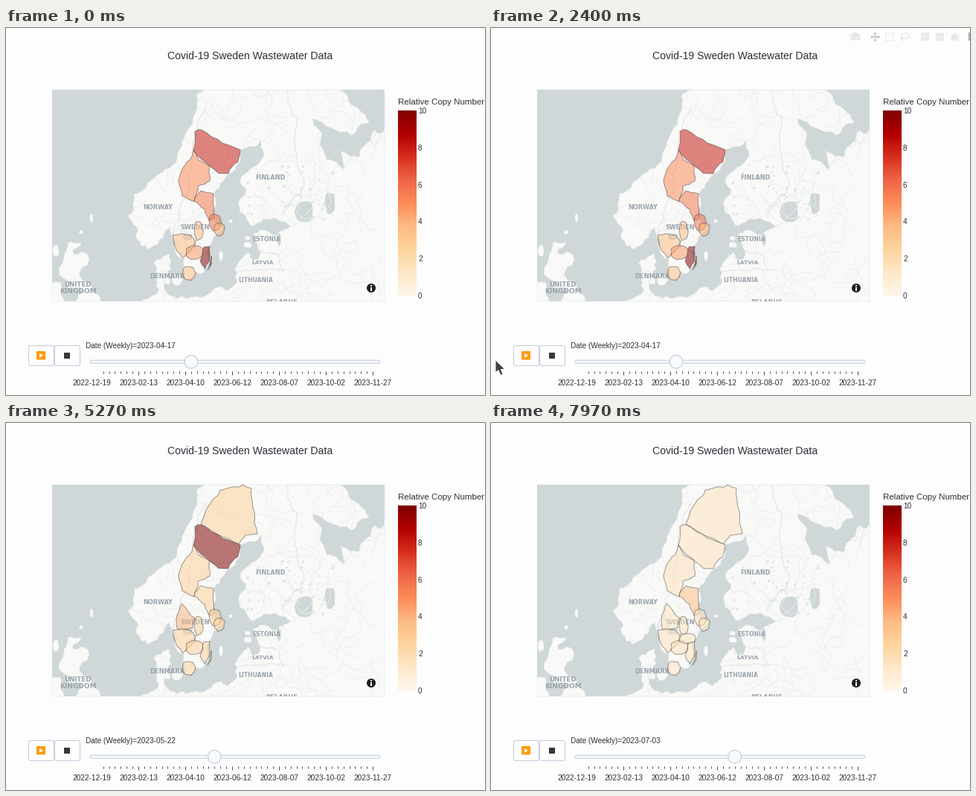
Animation, 644 px wide and 494 px high, one loop 8000 ms. Source, as a matplotlib script:

```python
import numpy as np
import matplotlib.pyplot as plt
from matplotlib.animation import FuncAnimation
from matplotlib.collections import EllipseCollection, LineCollection
from matplotlib.patches import Circle, Ellipse, FancyBboxPatch, Polygon, Rectangle

W, H, DPI = 644, 494, 100
LOOP, STEP_MS = 8000, 40
PAGE, INK, EDGE = "#fdfdfd", "#2e3038", "#c6cfdf"
WATER, LAND, COAST, ROAD = "#cfd7d8", "#f9f9f7", "#e6eaea", "#ecefef"
LEFT, RIGHT, TOP, BOTTOM = 62, 509, 83, 368
HEAT = plt.get_cmap("OrRd")

rng = np.random.RandomState(5)
fig = plt.figure(figsize=(W / DPI, H / DPI), dpi=DPI, facecolor=PAGE)
ax = fig.add_axes([0, 0, 1, 1])
ax.axis("off")


def add(patch):
    return ax.add_patch(patch)


def rect(x, y, w, h, color, **kw):
    return add(Rectangle((x, y), w, h, fc=color, ec="none", **kw))


def rounded(x, y, w, h, r, **kw):
    return add(FancyBboxPatch((x + r, y + r), w - 2 * r, h - 2 * r,
                              boxstyle=f"round,pad={r}", **kw))


def label(x, y, s, px, color=INK, ha="left", font="Liberation Sans", **kw):
    return ax.text(x, y, s, fontsize=px * 72 / DPI, color=color, ha=ha,
                   family=font, **kw)


def points(*c):
    return np.array(c, float).reshape(-1, 2)


def geo(*c):
    """Longitude/latitude pairs to Mercator pixels."""
    lon, lat = points(*c).T
    north = np.degrees(np.log(np.tan(np.radians(45 + lat / 2))))
    return np.column_stack([245 + (lon - 13.5) * 8.75, 339 - (north - 66.84) * 8.8])


def rough(p, amp=0.13, levels=3, closed=True):
    """Fractal outline: shift the middle of every edge sideways, repeatedly."""
    for _ in range(levels):
        q = np.roll(p, -1, 0) if closed else p[1:]
        a = p if closed else p[:-1]
        side = (q - a)[:, ::-1] * (1, -1)
        length = np.hypot(*side.T)
        side *= (np.minimum(1, 22 / np.maximum(length, 1)) * amp
                 * rng.normal(size=len(a)))[:, None]
        out = np.empty((2 * len(a), 2))
        out[::2], out[1::2] = a, (a + q) / 2 + side
        p = out if closed else np.vstack([out, p[-1:]])
    return p


def blob(cx, cy, w, h):
    """Uneven, slightly boxy oval."""
    a = np.linspace(0, 2 * np.pi, 14, endpoint=False)
    ring = np.column_stack([np.cos(a), np.sin(a)])
    ring = np.sign(ring) * np.abs(ring) ** 0.8 * rng.normal(1, 0.07, (14, 1))
    return (cx, cy) + ring * (w / 2, h / 2)


def on_map(p):
    return np.clip(p, (LEFT, TOP), (RIGHT, BOTTOM))


# ---- base map ----
norway = geo(16.5, 70, 14.4, 67.3, 12.5, 65.4, 9.5, 63.7, 5.2, 62.2, 5.0, 60,
             5.6, 58.8, 7.2, 58, 9.0, 58.6, 10.6, 59.7)
sweden = geo(11.3, 58.8, 12.8, 56.4, 13, 55.4, 14.3, 55.5, 14.6, 56.1, 15.9, 56.1,
             16.7, 58.2, 18.8, 59.6, 17.3, 60.7, 17.4, 62.2, 20.8, 63.9, 21.6, 65.2)
finland = geo(24.6, 65.8, 25.2, 64.9, 21.5, 63, 21.4, 60.9, 23, 59.9, 26.5, 60.4,
              30.2, 60)
baltic = geo(28.2, 59.5, 23.5, 59.2, 24.3, 57.2, 23.4, 57, 22.6, 57.7, 21, 56.7,
             21, 55.2, 19.5, 54.4, 18.5, 54.8, 14.2, 53.9, 11, 54)
denmark = geo(9.8, 55, 10.8, 56.3, 10.6, 57.6, 8.2, 56.8, 8.7, 54.2, 6, 53.4, 6, 52)
russia = geo(46, 52, 46, 66.4, 42.2, 66.4, 39.9, 64.8, 36.8, 65.1, 37.4, 63.9,
             34.8, 64.5, 32.6, 67.1, 38.5, 66.1, 41.3, 66.9, 38, 68.4, 36, 70)
britain = geo(-5, 58.5, -3.1, 58.6, -4.1, 57.6, -2, 57.6, -3.2, 56, -1.5, 55,
              0.1, 53.4, 0, 52, -4, 52, -3, 54.7, -4.9, 54.7, -6, 56.7)
ireland = geo(-9, 55.2, -6.1, 55.2, -6, 53, -9, 53)
borders = [geo(11.3, 59, 12.3, 61.5, 14, 64.2, 16.3, 67.8),
           geo(27.8, 60.6, 31.3, 62.8, 29.8, 66, 28.7, 68.7),
           geo(21, 56.1, 24.5, 56.3, 28.2, 56.2, 27.4, 57.5, 24.3, 57.9)]

rect(LEFT, TOP, RIGHT - LEFT, BOTTOM - TOP, WATER)
frame = Rectangle((LEFT, TOP), RIGHT - LEFT, BOTTOM - TOP, transform=ax.transData)
mainland = rough(np.vstack([norway, sweden, finland, baltic, denmark, russia]))
land = add(Polygon(on_map(mainland), fc=LAND, ec=COAST, lw=0.5))

roads = []
for _ in range(170):
    turn = rng.uniform(0, 2 * np.pi) + np.cumsum(rng.normal(0, 0.35, 14))
    walk = np.cumsum(np.column_stack([np.cos(turn), np.sin(turn)]) * 4, 0)
    roads.append(on_map(rng.uniform([170, TOP], [RIGHT, BOTTOM]) + walk))
net = ax.add_collection(LineCollection(roads, colors=ROAD, lw=0.6))
net.set_clip_path(land)

n = 70
size = rng.uniform(0.8, 3.2, n)
ponds = ax.add_collection(EllipseCollection(
    size, size * 1.7, rng.uniform(20, 70, n), units="xy", facecolors="#dfe4e4",
    offsets=rng.uniform([325, 185], [440, 258], (n, 2)),
    offset_transform=ax.transData))
ponds.set_clip_path(land)
ax.add_collection(LineCollection(
    [on_map(rough(b, 0.1, closed=False)) for b in borders], colors="#e2e5e6", lw=0.8))

# islands, then lakes: centre and size
for shape in [rough(britain), rough(ireland)] + [blob(*b) for b in (
        (230, 339, 14, 14), (217, 341, 8, 8), (289, 307, 5, 14), (325, 292, 11, 7),
        (325, 283, 7, 5), (302, 260, 5, 4), (67, 300, 8, 14), (115, 256, 4, 11),
        (101, 275, 5, 5), (260, 92, 7, 9))]:
    add(Polygon(on_map(shape), fc=LAND, ec=COAST, lw=0.4))
for b in ((401, 247, 24, 26), (436, 236, 14, 28), (367, 285, 5, 16),
          (244, 281, 13, 9), (254, 291, 3, 13)):
    add(Polygon(blob(*b), fc=WATER))

for x, y, name, px in [
        (204, 241.5, "NORWAY", 8.2), (355.5, 201, "FINLAND", 8.2),
        (97, 344.5, "UNITED", 8.8), (97, 353.5, "KINGDOM", 9.0),
        (350, 284, "ESTONIA", 7.7), (345, 315, "LATVIA", 7.5),
        (336, 339, "LITHUANIA", 7.6), (217, 334, "DENMARK", 8.4),
        (371, 368.5, "BELARUS", 8.4), (254, 268, "SWEDEN", 8.2)]:
    text = label(x, y + px * 0.365, name, px, "#9aa4ad", "center", "DejaVu Sans",
                 weight="bold", clip_on=True)
    text.set_clip_path(frame)

# ---- counties: outline, first slot with data, outbreaks (slot, height) ----
counties = [
    (points(284, 98, 266, 126, 262, 136, 284, 150, 313, 163, 322, 151, 338, 149,
            334, 120, 330, 88, 318, 83, 304, 86, 288, 90), 20, [(24, 2.8)]),
    (points(254, 139, 263, 137, 291, 155, 315, 164, 312, 180, 299, 196, 275, 187,
            252, 164), 17, [(17.5, 6), (19, 7), (20, 7), (21, 7), (24, 2.6)]),
    (points(252, 164, 273, 185, 274, 206, 258, 213, 253, 234, 237, 226, 232, 204,
            238, 188, 247, 178), 17, [(18, 5), (24, 8)]),
    (points(262, 219, 279, 223, 280, 256, 273, 259, 267, 244, 253, 233),
     17, [(18, 7), (26.5, 2.8)]),
    (points(236, 243, 254, 263, 251, 276, 231, 278, 229, 264), 20, [(21, 1.2)]),
    (points(224, 279, 249, 279, 255, 287, 238, 310, 229, 299), 17, []),
    (points(266, 295, 274, 294, 273, 314, 267, 324, 261, 314), 17, [(17, 7)]),
    (points(276, 307, 276, 313, 271, 326), 17, [(17, 7)]),
    (blob(281, 262, 16, 22), 17, [(18, 7)]),
    (blob(287, 271, 14, 18), 17, [(18, 1.5)]),
    (blob(259, 273, 12, 24), 17, []),
    (blob(253, 302, 22, 18), 17, [(17, 1), (24.5, 2.8)]),
    (blob(264, 290, 22, 14), 23, [(24, 2)]),
    (blob(246, 330, 16, 18), 17, []),
]
patches = [add(Polygon(on_map(rough(p, 0.06, 2)), ec="#444444", lw=0.7, zorder=5))
           for p, _, _ in counties]


def fills(slot):
    """Falling base level plus bell-shaped outbreaks, as half-clear colours."""
    out = []
    for _, first, outbreaks in counties:
        v = 3.6 - 0.22 * (slot - 17)
        v += sum(h * np.exp(-((slot - s) / 0.9) ** 2) for s, h in outbreaks)
        out.append((*HEAT(min(v / 10, 1.0))[:3], 0.53 * (slot >= first)))
    return np.array(out)


# ---- info mark, title, colour bar ----
add(Circle((491, 350), 6, fc="#202020", zorder=6))
rect(490, 349, 2, 4.6, "white", zorder=7)
add(Circle((491, 346.8), 1.1, fc="white", zorder=7))

label(217, 42, "Covid-19 Sweden Wastewater Data", 14)
label(527, 103, "Relative Copy Number", 11.5)
ax.imshow(np.linspace(1, 0, 250)[:, None], cmap=HEAT, aspect="auto",
          extent=(527, 552, 361, 111.5))
for v in range(0, 11, 2):
    label(554, 364 - v * 24.9, str(v), 10)

# ---- buttons and slider ----
for x in (30.5, 65.5):
    rounded(x, 427.5, 34, 27, 2.5, fc="white", ec=EDGE, lw=0.8)
rounded(41, 435, 12, 11.5, 1, fc="#ff9a08", ec="none")
add(Polygon([(45, 437.8), (45, 443.8), (50, 440.8)], fc="white"))
rect(78, 436.5, 8.5, 8.5, "#383838")

date = label(107, 431, "", 10)
rounded(113, 447.3, 389.5, 4, 1.9, fc="#f8fafc", ec=EDGE, lw=0.8)
grip = add(Circle((249, 449.3), 8.8, fc="#f8fafc", ec=EDGE, lw=0.9, zorder=4))


def slot_x(slot):
    return 115 + 7.875 * slot


ticks = [(round(slot_x(k)) + 0.5, 465 + 2 * (k % 8 == 0)) for k in range(2, 49)]
ax.add_collection(LineCollection([[(x, 462), (x, y)] for x, y in ticks],
                                 colors="#4c4c54", lw=0.72))
for k, day in enumerate(["2022-12-19", "2023-02-13", "2023-04-10", "2023-06-12",
                         "2023-08-07", "2023-10-02", "2023-11-27"]):
    label(slot_x(8 * k), 481, day, 10.1, ha="center")

# ---- toolbar ----
IDLE, ACTIVE = "#c7c7c7", "#808080"
line = dict(fill=False, ec=IDLE, lw=1.1)
tools = [
    rounded(483.5, 8, 13, 8.5, 1.2, fc=IDLE, ec="none"),
    rect(487.5, 6.3, 5, 2.5, IDLE),
    add(Circle((490, 12.2), 2.9, fc=PAGE)),
    add(Circle((490, 12.2), 1.6, fc=IDLE)),
    rect(511, 11.3, 11, 1.5, ACTIVE),
    rect(515.8, 6.5, 1.5, 11, ACTIVE),
    add(Rectangle((531, 7), 10.5, 10, ls=(0, (2, 1)), **line)),
    add(Ellipse((557, 10.5), 11, 7.5, angle=-15, **line)),
    add(Polygon([(552.5, 13), (552, 15.5), (554.5, 17.5)], closed=False, **line)),
]
for way in np.array([(1, 0), (-1, 0), (0, 1), (0, -1)]):
    tip = (516.5, 12) + 6.5 * way
    back, side = tip - 2.8 * way, 2.5 * way[::-1]
    tools.append(add(Polygon([tip, back + side, back - side], fc=ACTIVE)))
for x in (578, 598):
    tools += [rounded(x, 6.3, 11, 11, 1, fc=IDLE, ec="none"),
              rect(x + 2.2, 11, 6.6, 1.6, PAGE)]
tools += [
    rect(582.7, 8.5, 1.6, 6.6, PAGE),
    add(Polygon([(617, 12.5), (623.5, 6.3), (630, 12.5)], fc=IDLE)),
    rect(619, 12.5, 9, 5, IDLE),
    rect(622.2, 13.5, 2.6, 4, PAGE),
    rect(642, 6, 2, 11, "#202020"),
]

# ---- pointer ----
ARROW = points(0, 0, 0, 17, 4, 13.5, 7, 20.5, 10, 19, 7.3, 12.5, 12.5, 12)
HAND = points(-1.5, 1, 0.5, 0, 2.5, 1, 3, 7, 10, 8.5, 12, 10.5, 11.5, 16, 9.5, 21,
              0, 21, -2, 17, -6.5, 11.5, -5, 9.5, -1, 12)
pointer = add(Polygon(ARROW, fc="#404040", ec="white", lw=0.6, zorder=9))
AWAY, EDGE_REST, BUTTON, GONE = points(-16, 462, 6, 447, 33, 442.5, -22, 452)


def ease(t, start, end):
    u = np.clip((t - start) / (end - start), 0, 1)
    return u * u * (3 - 2 * u)


START, PERIOD, FADE = 3328, 512, 250
DATES = ["2023-" + d for d in (
    "04-17 04-24 05-08 05-15 05-22 05-29 06-05 06-12 06-19 06-26 07-03").split()]
FILLS = [fills(17 + k) for k in range(len(DATES))]


def draw(i):
    t = i * STEP_MS
    k = int(np.clip((t - START) // PERIOD + 1, 0, len(DATES) - 1))
    mix = min((t - START - (k - 1) * PERIOD) / FADE, 1) if k else 1
    shades = FILLS[k] * mix + FILLS[max(k - 1, 0)] * (1 - mix)
    for patch, rgba in zip(patches, shades):
        patch.set_facecolor(rgba)
        patch.set_edgecolor((0.27, 0.27, 0.27, rgba[3]))

    # date and grip jump together, only the map fades
    date.set_text("Date (Weekly)=" + DATES[k])
    grip.center = slot_x(17 + k), 449.3

    at = (AWAY + (EDGE_REST - AWAY) * ease(t, 2220, 2400)
          + (BUTTON - EDGE_REST) * ease(t, 2440, 2900)
          + (GONE - BUTTON) * ease(t, 3760, 4140))
    pointer.set_xy((HAND if at[0] >= 29 else ARROW) + at)

    hover = ease(t, 2260, 2600) * (1 - ease(t, 4080, 4400))
    for tool in tools:
        tool.set_alpha(hover)
    return []


ax.set_xlim(0, W)
ax.set_ylim(H, 0)
anim = FuncAnimation(fig, draw, frames=LOOP // STEP_MS, interval=STEP_MS,
                     init_func=lambda: draw(0), repeat=True, repeat_delay=0)
plt.show()
```
